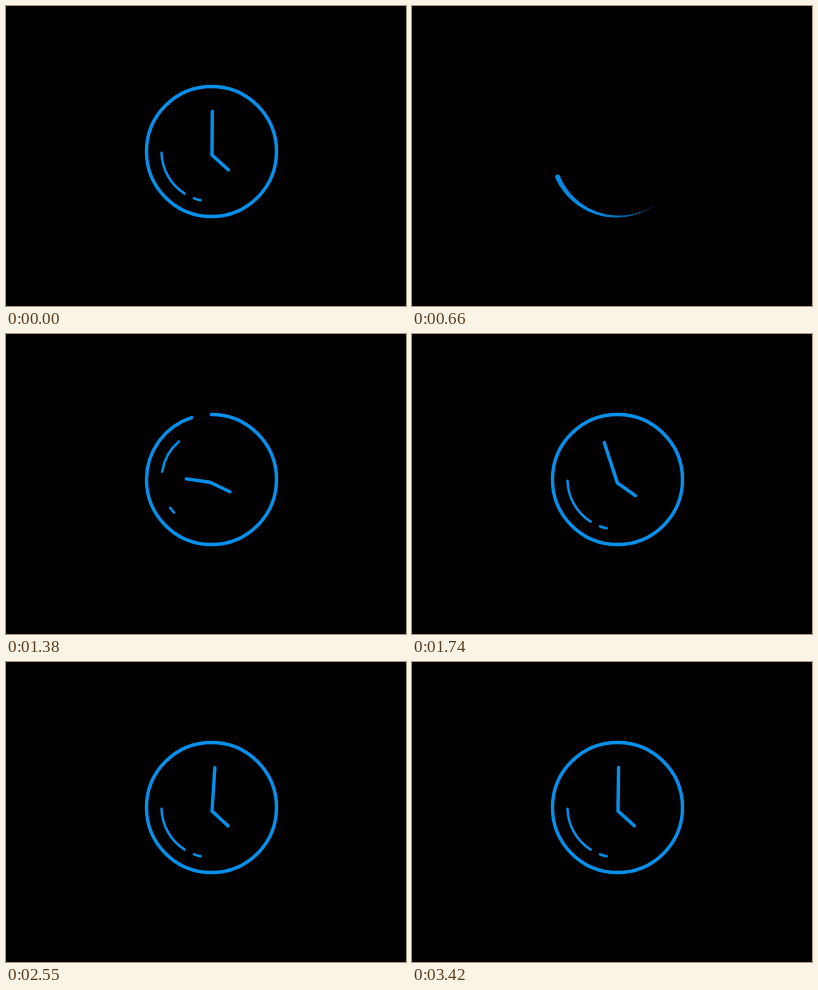
An HTML page with a canvas that plays this animation: 400x300 px, repeating every 3450 ms.

```html
<!DOCTYPE html>
<html lang="en">
<head>
<meta charset="utf-8">
<title>Clock</title>
<style>
html, body { margin: 0; width: 100%; height: 100%; overflow: hidden; background: #000; }
canvas { display: block; width: 400px; height: 300px; }
</style>
</head>
<body>
<canvas id="stage" width="400" height="300"></canvas>
<script>
const ctx = document.getElementById('stage').getContext('2d');
const LOOP = 3450, STEP = 30, BLUE = '#0790ea';
const CX = 205.5, CY = 145.5, R = 65;
const SETTLE = 1824;

const rad = deg => (deg - 90) * Math.PI / 180; // 0 is up, clockwise
const span = (t, from, to) => Math.min(1, Math.max(0, (t - from) / (to - from)));
const easeOut = (u, p) => 1 - Math.pow(1 - u, p);
const mix = (a, b, u) => a + (b - a) * u;

function arc(r, from, to, width, cap = 'round') {
  ctx.lineWidth = width;
  ctx.lineCap = cap;
  ctx.beginPath();
  ctx.arc(CX, CY, r, rad(from), rad(to));
  ctx.stroke();
}

function comet(t) {
  const lead = Math.pow(span(t, 30, 810), 1.765);
  const head = 360 * lead;
  const tail = 360 * Math.pow(span(t, 30, 970), 2.41);
  if (tail >= 360) return;
  const full = 3.5 + 2 * lead, n = 90, d = (head - tail) / n;
  for (let i = 0; i < n; i++) {
    const u = (i + 0.5) / n;
    ctx.globalAlpha = Math.min(1, 0.25 + 1.3 * u);
    arc(R, tail + d * i, tail + d * (i + 1) + 0.3, full * u, 'butt');
  }
  ctx.globalAlpha = 1;
  if (t <= 810) arc(R, head - 0.05, head, full);
}

function pulse(t) {
  const u = span(t, 810, 1080);
  if (u <= 0 || u >= 1) return;
  const outer = 18 * easeOut(u, 3.5), inner = 18 * easeOut(u, 1.3);
  if (outer <= inner) return;
  ctx.lineWidth = outer - inner;
  ctx.beginPath();
  ctx.arc(205, CY - R, (outer + inner) / 2, 0, 7);
  ctx.stroke();
}

function rim(t) {
  const u = span(t, 810, 1500);
  if (u > 0) arc(R, 0, 360 * easeOut(u, 1.72), 3.4);
}

function glint(t, start, end, from, to) {
  const u = span(t, start, end);
  if (u <= 0) return;
  const e = easeOut(u, 2);
  arc(50, mix(450, from, e), mix(450, to, e), 2.5);
}

// Approach on a parabola, then ring down.
function swing(t, a, b, amp) {
  const s = SETTLE - t;
  if (s > 0) return -a * s + b * s * s;
  return amp * Math.exp(0.002 * s) * Math.sin(-s * Math.PI / 333);
}

function hands(t) {
  if (t < 900) return;
  const x = 206 - 2 * Math.sin(Math.PI * span(t, 930, 1830));
  const y = mix(148.2, 149, span(t, 1380, 1800));
  const tip = (deg, len) => [x + len * Math.cos(rad(deg)), y + len * Math.sin(rad(deg))];
  const minute = tip(swing(t, 0.222, 8.43e-5, 30), 43.5 * span(t, 915, 1760));
  const hour = tip(132 + swing(t, 0.0875, 1.133e-4, 6), 22 * easeOut(span(t, 900, 1160), 2));
  ctx.lineWidth = 3.4;
  ctx.lineCap = ctx.lineJoin = 'round';
  ctx.beginPath();
  ctx.moveTo(...minute);
  ctx.lineTo(x, y);
  ctx.lineTo(...hour);
  ctx.stroke();
}

function draw(now) {
  // The loop opens on the settled clock.
  const t = Math.floor(now % LOOP / STEP) * STEP || LOOP;
  ctx.fillStyle = '#000';
  ctx.fillRect(0, 0, 400, 300);
  ctx.strokeStyle = BLUE;
  comet(t);
  rim(t);
  pulse(t);
  glint(t, 887, 1675, 192.5, 200.5);
  glint(t, 1060, 1740, 212.5, 268.5);
  hands(t);
}

const begin = performance.now();
function tick() {
  draw(performance.now() - begin);
  requestAnimationFrame(tick);
}
tick();
</script>
</body>
</html>
```
